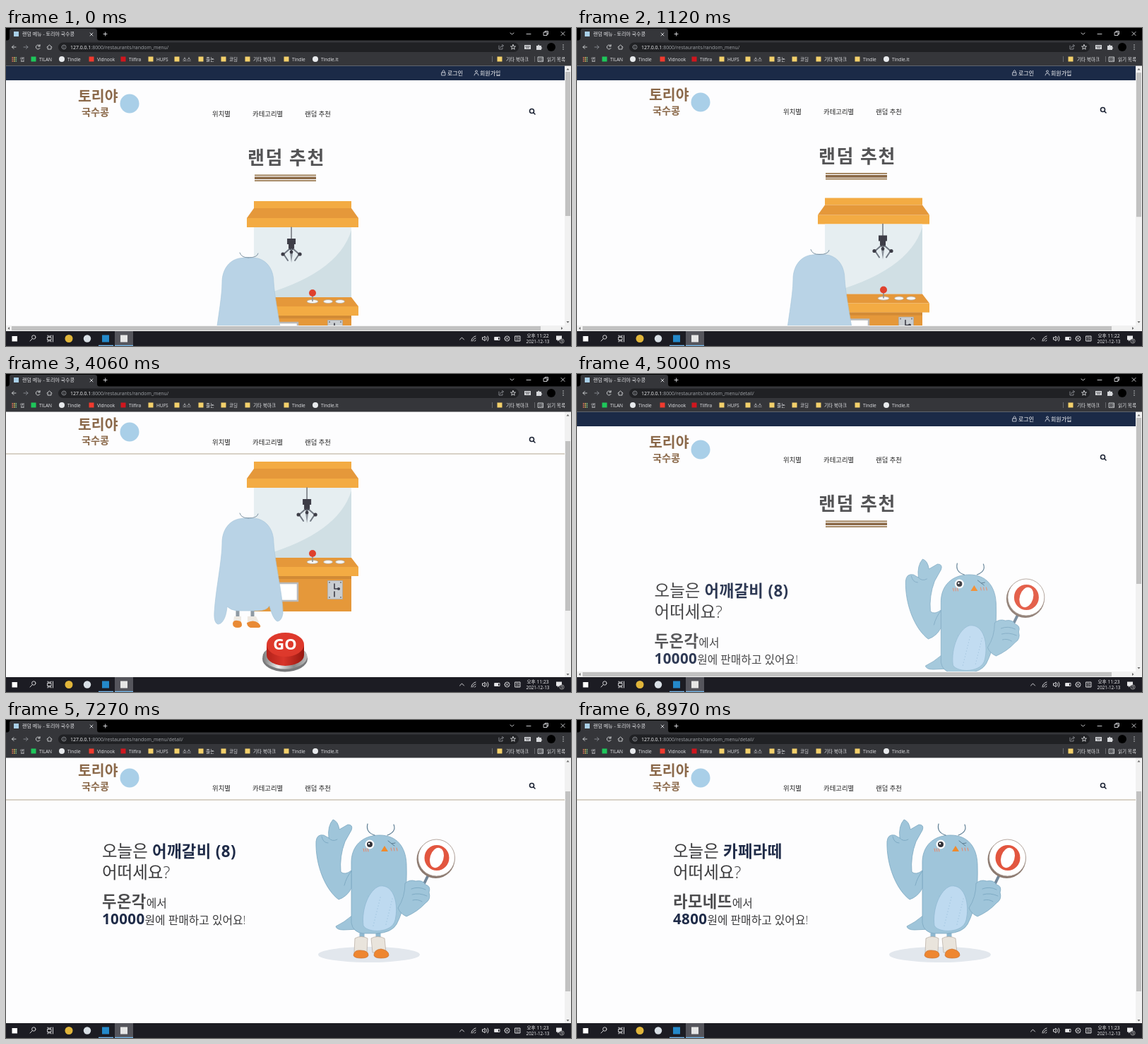
An HTML page for the animation above (9 s loop, 800 by 450 pixels).

```html
<!DOCTYPE html>
<html lang="ko">
<head>
<meta charset="utf-8">
<style>
html, body { margin: 0; width: 100%; height: 100%; overflow: hidden; background: #000 }
svg { display: block; width: 100vw; height: 100vh; font-family: "Open Sans", "Noto Sans CJK KR", sans-serif }
.line { fill: none; stroke-linecap: round; stroke-linejoin: round }
.light { font-weight: 300 }
.big { font-size: 22.3px; font-weight: 700; letter-spacing: .4px }
.pale { fill: #b9d3e6; stroke: #a9c7dc; stroke-width: .7 }
.blue { fill: #9fc5da; stroke: #7ba8c1; stroke-width: .8 }
</style>
</head>
<body>
<svg viewBox="0 0 800 450">
<defs>
  <clipPath id="view"><rect y="53" width="791" height="376"/></clipPath>
  <linearGradient id="metal"><stop stop-color="#777"/><stop offset=".35" stop-color="#eee"/><stop offset=".7" stop-color="#888"/><stop offset="1" stop-color="#bbb"/></linearGradient>
  <linearGradient id="red"><stop stop-color="#b3221a"/><stop offset=".45" stop-color="#d8352a"/><stop offset="1" stop-color="#96170f"/></linearGradient>
</defs>
<rect y="53" width="800" height="376" fill="#fdfdfe"/>

<g clip-path="url(#view)">
  <!-- claw machine page -->
  <g id="menu">
    <path fill="#f3ab43" d="M351 245h138v10H351zM341 269h158v13H341z"/>
    <path fill="#e5983a" d="M351 255H489L499 269H341z"/>
    <path fill="#e6eef1" d="M351 282h138v99H351z"/>
    <path fill="#d0dfe4" d="M489 286Q470 350 351 381H489z"/>
    <g id="claw">
      <path class="line" stroke="#777b82" stroke-width="1.6" d="M0 282v17"/>
      <path fill="#3d3d47" d="M-6 298H6V306H4V314H-4V306H-6z"/>
      <path class="line" stroke="#6f7680" stroke-width="2" d="M-3 313L-11 320L-5 329M3 313L11 320L5 329M0 313V320"/>
      <path fill="#8b929b" d="M-2 318H2L0 332z"/>
      <g fill="#3d3d47"><circle cx="-12" cy="320" r="2.6"/><circle cx="12" cy="320" r="2.6"/><circle cy="317" r="2.4"/></g>
    </g>
    <path fill="#e5983a" d="M351 381H489L499 394H341zM351 407h138v50H351z"/>
    <path fill="#f3ab43" d="M341 394h158v13H341z"/>
    <path fill="#d18a35" d="M351 407h138v4H351z"/>
    <path fill="#fff" stroke="#b9b9b9" stroke-width="2.5" d="M379 417h34v25H379z"/>
    <path fill="#c9cdd1" stroke="#a5a9ad" stroke-width=".7" d="M455.500 413.500h21v26h-21z"/>
    <path class="line" stroke="#3d3d47" stroke-width="1.6" d="M465 418v7M465 429v7M465 425h7"/>
    <circle cx="471" cy="425" r="2" fill="#3d3d47"/>
    <g fill="#777"><circle cx="458" cy="416" r="1"/><circle cx="474" cy="416" r="1"/><circle cx="458" cy="437" r="1"/><circle cx="474" cy="437" r="1"/></g>
    <g fill="#f6f6f6" stroke="#b7aa98" stroke-width=".8">
      <ellipse cx="434" cy="387" rx="8" ry="2.600"/><ellipse cx="456" cy="387" rx="6.500" ry="2.500"/><ellipse cx="473" cy="387" rx="6.500" ry="2.500"/>
    </g>
    <path stroke="#8f8f8f" stroke-width="1.6" d="M434 378v9"/>
    <circle cx="434" cy="375" r="5" fill="#df412d"/>
    <!-- owl from behind -->
    <path stroke="#8f9aa3" stroke-width="5" d="M328 452v13M349 452v13"/>
    <path fill="#eee9e2" d="M323 464h10v8H322zM342 464h12l4 8H342z"/>
    <path fill="#e98a35" d="M321 474q1-5 7-4q6 0 6 6q0 4-6 4q-7 0-7-6M341 473q9-5 16 0q6 6 1 7H346q-5-2-5-7"/>
    <path class="pale" d="M330 326Q343 323 357 326C371 330 379 343 379 360C381 390 393 440 392 460Q390 471 384 471Q378 468 373 449Q369 456 356 456H327Q318 455 313 450C312 464 307 475 300 475Q294 473 295 458C297 425 306 385 306 360C306 343 315 329 330 326z"/>
    <path class="line" stroke="#7d93a3" stroke-width="1" d="M331 318Q333 325 343 325M357 319Q356 325 343 325"/>
    <!-- button -->
    <ellipse cx="395" cy="524" rx="32" ry="18.500" fill="#77787a"/>
    <ellipse cx="395" cy="521" rx="31.500" ry="17.500" fill="url(#metal)"/>
    <path fill="url(#red)" d="M369 505V519A26.500 15 0 0 0 422 519V505z"/>
    <ellipse cx="395.500" cy="504" rx="26.500" ry="17" fill="#de392c"/>
    <text x="395" y="511" font-size="22" font-weight="700" fill="#fff" text-anchor="middle">GO</text>
  </g>

  <!-- result page -->
  <g id="result">
    <g id="words" font-size="23.5" fill="#3a3a3c">
      <text class="light" x="136" y="315" xml:space="preserve">오늘은 <tspan class="big" id="dish" fill="#1f2b48"></tspan></text>
      <text class="light" x="136" y="345">어떠세요?</text>
      <g font-size="15.8">
        <text class="light" x="136" y="386"><tspan class="big" id="shop" fill="#4c4c4e"></tspan>에서</text>
        <text class="light" x="136" y="410"><tspan class="big" id="price" fill="#1f2b48" style="font-size:20.500px"></tspan>원에 판매하고 있어요!</text>
      </g>
    </g>
    <g id="owl"><g transform="translate(0 121)">
      <ellipse cx="514" cy="332" rx="72" ry="11" fill="#e2e7ed"/>
      <path stroke="#8fb8d0" stroke-width="7" d="M504 298v14M527 298v14"/>
      <path fill="#e9e4dc" stroke="#b5aaa0" stroke-width=".7" d="M494 309Q503 304 512 309L511 329H493zM517 309Q526 304 536 309L538 329H519z"/>
      <path fill="#ee8630" stroke="#c86f2b" stroke-width=".7" d="M492 333Q493 325 502 326Q513 326 513 333Q512 337 503 337Q493 337 492 333M521 333Q521 325 531 324Q542 326 542 333Q541 337 531 337Q522 337 521 333"/>
      <path class="blue" d="M491 276Q478 287 467 292Q468 297 478 297L500 296z"/>
      <path class="blue" d="M489 204C488 178 505 163 529 163C553 163 566 179 567 204C568 240 565 266 553 289Q546 301 525 302H505Q491 300 489 287z"/>
      <path fill="#bedaf0" stroke="#8db6d0" stroke-width=".7" d="M529 235C550 232 556 262 551 283C547 302 512 302 506 291C503 267 514 240 529 235z"/>
      <g id="dots" fill="#8fb7d4"></g>
      <path class="blue" d="M471 254C452 240 438 205 439 172Q440 161 450 163L457 167Q455 150 463 141Q470 143 472 155L484 148Q492 148 489 156L480 172Q472 193 474 215Q480 220 489 213V238Q483 250 471 254z"/>
      <path class="line" stroke="#7ba8c1" stroke-width=".9" d="M457 167Q462 173 469 169M447 165Q449 174 456 174M489 214Q482 222 479 234"/>
      <path class="line" stroke="#5f7f95" stroke-width="1.2" d="M512 147Q509 159 522 163M549 148Q553 158 540 163"/>
      <circle cx="515" cy="176" r="6.500" fill="#fff"/><circle cx="515" cy="176" r="4" fill="#33343b"/><circle cx="514" cy="175" r="1.200" fill="#fff"/>
      <path class="line" stroke="#597b90" stroke-width="1" d="M541 171L546 175L551 174M546 175L550 178"/>
      <path fill="#f08a2c" d="M536 178L531 186H541z"/>
      <path class="line" stroke="#e28d72" stroke-width="1.1" d="M506 182l1 4M509 182l1 4M512 182l1 4M545 181l1 4M549 181l1 4M553 181l1 4"/>
      <path stroke="#72879a" stroke-width="4" d="M600 215L584 248"/>
      <circle cx="608.500" cy="197" r="27" fill="#8c7a70"/>
      <circle cx="609.500" cy="195" r="26" fill="#fff" stroke="#a08f84" stroke-width=".8"/>
      <ellipse cx="610" cy="195" rx="17.500" ry="18" fill="#e2563f"/>
      <ellipse cx="610" cy="195" rx="9.500" ry="14.500" fill="#fff" transform="rotate(17 610 195)"/>
      <path class="blue" d="M565 231Q572 225 580 228Q590 226 594 233Q602 235 599 244Q602 254 594 259Q583 271 567 278Q558 274 555 266Q565 251 565 231z"/>
      <path class="line" stroke="#7ba8c1" stroke-width=".9" d="M574 239Q584 235 594 240M575 247Q585 244 596 249M576 255Q583 253 589 257"/>
    </g></g>
  </g>

  <g id="title">
    <text x="342" y="193" font-size="26" font-weight="700" letter-spacing="1.5" fill="#545456">랜덤 추천</text>
    <path fill="#9a7a50" d="M352 207.500h87v1.700h-87zM352 215.300h87v1.700h-87z"/>
    <path fill="#8b6a48" d="M352 210.500h87v3.600h-87z"/>
  </g>

  <g id="bar"><path fill="#fdfdfe" d="M0 53h791v60H0z"/><path fill="#b3a692" d="M0 112.500h791v1H0z"/></g>
  <g id="head">
    <g fill="#8b694a" font-weight="700"><text x="102" y="104" font-size="20.500">토리야</text><text x="107" y="124" font-size="14.200">국수콩</text></g>
    <circle cx="175" cy="107" r="13.500" fill="#a9cfe8"/>
    <g font-size="9.4" fill="#222"><text x="292" y="124.500">위치별</text><text x="349" y="124.500">카테고리별</text><text x="423" y="124.500">랜덤 추천</text></g>
    <path class="line" stroke="#1b2233" stroke-width="1.6" d="M747 120l2 2M747.500 117.500a3 3 0 1 0-6 0a3 3 0 1 0 6 0"/>
  </g>
  <g id="top">
    <path fill="#1b2a47" d="M0 53.500h791V74H0z"/>
    <g fill="#fff" font-size="8"><text x="625" y="66.500">로그인</text><text x="671" y="66.500">회원가입</text></g>
    <path class="line" stroke="#d8dce4" stroke-width=".8" d="M617 63h5v4h-5zM618 63v-2q1.500-3 3 0v2M663 67q0-3 3-3t3 3M664.500 61.500a1.500 1.500 0 1 0 3 0a1.500 1.500 0 1 0-3 0"/>
  </g>
</g>

<path fill="#f1f1f1" d="M791 53.500h9V429h-9z"/>
<rect id="thumb" x="792" width="7" fill="#c1c1c1"/>
<path fill="#666" d="M793.500 59.500l2-2.500l2 2.500z"/>
<path id="down" fill="#666" d="M793.500 424l2 2.500l2-2.500z"/>
<g id="hbar">
  <path fill="#f1f1f1" d="M0 421h800v8H0z"/><path fill="#c1c1c1" d="M8 422h749v6H8z"/>
  <path fill="#666" d="M5 423l-2.500 2l2.500 2zM786 423l2.500 2l-2.500 2z"/>
</g>

<!-- browser frame -->
<path d="M0 0h800v18H0z"/>
<path fill="#35363a" d="M0 17.500H2Q5 17 5 13V4Q5 1 8 1H125Q129 1 129 4V14Q129 17.500 132 17.500H800V53.500H0z"/>
<rect x="11" y="5" width="7" height="7" fill="#a9cfe8"/>
<text x="23" y="11" font-size="7" fill="#e4e5e8">랜덤 메뉴 - 토리야 국수콩</text>
<path class="line" stroke="#dcdde0" stroke-width=".9" d="M119 7l4 4M123 7l-4 4M138 8.500h5M140.500 6v5M714 7l2.500 2l2.500-2M737 8.500h6M761.500 6h4.500v4.500h-4.500zM763 6V4.500h4.500V9H766M786 5.500l5 5M791 5.500l-5 5"/>
<rect x="74" y="20.500" width="652" height="13.500" rx="6.700" fill="#202124"/>
<text x="91" y="29.700" font-size="6.950" fill="#9fa3a8"><tspan fill="#f1f2f4">127.0.0.1</tspan><tspan id="path"></tspan></text>
<g class="line" stroke="#d5d7da" stroke-width=".9">
  <path d="M14 27H8.500M11 24.500L8.500 27L11 29.500M48 25.500A3 3 0 1 0 48 28.500M48 23.500v2.500h-2.500M58 27l3.500-3l3.500 3M59 27v3h5v-3"/>
  <path stroke="#8b8e93" d="M25 27h6M28.500 24.500L31 27L28.500 29.500M79 27a3 3 0 1 0 6 0a3 3 0 1 0-6 0M82 26.500v2M82 25.200v.1M698 25v5h5v-2M700 28q0-3 4-3M702.500 23.500L704.500 25L702.500 26.500"/>
  <path d="M718 23.500l1 2.500h2.500l-2 1.700l.7 2.500l-2.200-1.500l-2.200 1.500l.7-2.500l-2-1.700h2.500z"/>
</g>
<path fill="#d5d7da" d="M734 24h9v6h-9zM751 25h2q1-3 2.500 0h2.500v2.200q2.500 1 0 2v1.800h-7z"/>
<path stroke="#35363a" stroke-width=".8" d="M735 26h7M736 28h5"/>
<circle cx="772" cy="27" r="6"/>
<path class="line" stroke="#d5d7da" stroke-width="1.500" d="M789 24v.1M789 27v.1M789 30v.1"/>
<g id="marks" font-size="6.600" fill="#e4e5e8"></g>
<path stroke="#66686c" d="M688.500 40v8M748.500 40v8"/>
<path class="line" stroke="#d5d7da" stroke-width=".9" d="M753.500 41h7v6.500h-7zM755 43h1M757.500 43h2M755 45.500h1M757.500 45.500h2"/>

<!-- taskbar -->
<path fill="#1c1c23" d="M0 429h800v21H0z"/>
<path fill="#55555c" d="M154 429h26v21h-26z"/>
<path fill="#76b9ed" d="M131 448.800h21v1.200h-21zM154 448.800h26v1.200h-26z"/>
<path fill="#fff" d="M8.500 436h7.500v7.500H8.500z"/>
<circle cx="89" cy="439.500" r="5.500" fill="#e0b53a"/>
<circle cx="115" cy="439.500" r="5.200" fill="#d8dfe5"/>
<path fill="#2489ca" d="M136 434.500h10v10h-10z"/>
<path fill="#e6e6e6" d="M162 434.500h10v10h-10z"/>
<g class="line" stroke="#e8e8ea" stroke-width=".9">
  <path d="M34 443l3-3M42 437.500a2.700 2.700 0 1 0-5.400 0a2.700 2.700 0 1 0 5.400 0M59 437.500h5v4h-5zM59 435v1h5v-1M59 444v-1h5v1M66.500 435v9"/>
  <path d="M642.500 441l3-3l3 3M659 443q0-5 6-7M661 443q0-3 4-4M663.500 443l1.500-1M674.500 438v3h1.500l2 2v-7l-2 2zM680 437.500q1.500 2 0 4M682 436q2.500 3.500 0 7M692 437.500h7v4h-7zM706 439.500a3.500 3.500 0 1 0 7 0a3.500 3.500 0 1 0-7 0M708 438l3 3M711 438l-3 3M721 436h7v7h-7z"/>
</g>
<path fill="#e8e8ea" d="M692 437.500h5v4h-5zM779 435.500h8v6h-4l-2 2v-2h-2z"/>
<circle cx="787" cy="443" r="3.200" fill="#35353b" stroke="#ddd" stroke-width=".5"/>
<g fill="#f1f1f3" font-size="6.7" text-anchor="middle">
  <text x="724.500" y="442" font-size="6">한</text><text x="787" y="445" font-size="5.500">1</text>
  <text id="clock" x="753" y="437.500"></text><text x="753" y="446.300" font-size="6.300">2021-12-13</text>
</g>
</svg>
<script>
const $ = id => document.getElementById(id);
const FOLDER = '#f3d06b';

// [icon x, text x, label, icon colour, round]
const marks = [
  [39, 47, 'TILAN', '#1ec75a'], [79, 87, 'Tindle', '#e8eaed', 1], [121, 129, 'Vidnook', '#f03a2e'],
  [166, 174, 'Tilfira', '#d0161e'], [205, 213, 'HUFS', FOLDER], [242, 250, '소스', FOLDER],
  [276, 283, '졸논', FOLDER], [308, 316, '코딩', FOLDER], [342, 350, '기타 북마크', FOLDER],
  [397, 405, 'Tindle', FOLDER], [438, 446, 'Tindle.It', '#e8eaed', 1], [699, 708, '기타 북마크', FOLDER]
];
let html = '<text x="20" y="46.5">앱</text><text x="766" y="46.5">읽기 목록</text>';
for (let i = 0; i < 9; i++)
  html += `<rect x="${8.5 + i % 3 * 2.5}" y="${41 + (i / 3 | 0) * 2.5}" width="1.6" height="1.6" fill="${['#e8785f', '#dfc05a', '#79b98a'][i % 3]}"/>`;
for (const [x, tx, label, color, round] of marks)
  html += (round ? `<circle cx="${x}" cy="44" r="4" fill="${color}"/>`
    : `<rect x="${x - 3.5}" y="40.5" width="7" height="7" fill="${color}"/>`) + `<text x="${tx}" y="46.5">${label}</text>`;
$('marks').innerHTML = html;

let dots = '';
for (let i = 0; i < 22; i++)
  dots += `<circle cx="${513 + i * 17 % 35}" cy="${249 + i * 2}" r=".6"/>`;
$('dots').innerHTML = dots;

const clamp = v => Math.max(0, Math.min(1, v));
const smooth = v => (v = clamp(v), v * v * (3 - 2 * v));
const show = (id, on) => $(id).style.display = on ? '' : 'none';
const move = (id, x, y) => $(id).setAttribute('transform', `translate(${x} ${y})`);
const write = (id, text) => { if ($(id).textContent !== text) $(id).textContent = text; };
const LOAD = 4400, RELOAD = 7900;

function draw(t) {
  const detail = t >= LOAD, again = t >= RELOAD;
  const scroll = 121 * smooth((t - (detail ? 6004 : 1040)) / 700);
  const stuck = scroll > 12;
  show('menu', !detail);
  show('result', detail);
  show('top', !stuck);
  show('bar', stuck);
  show('hbar', !stuck);
  move('menu', 0, -scroll);
  move('result', 0, -scroll);
  move('title', 0, -Math.max(scroll * .55, scroll - 4));
  move('head', 0, -Math.min(25, scroll * .45));
  move('down', 0, stuck ? 0 : -9);
  move('claw', 414.3 + 21.4 * Math.sin(t * .0023 - .5), 0);

  // text and owl slide in from opposite sides
  const left = (1 - clamp((t - (again ? 8150 : 4750)) / 700)) ** 3;
  move('words', -100 * left, 0);
  move('owl', 100 * left, 0);
  $('result').setAttribute('opacity', 1 - left * left);

  $('thumb').setAttribute('y', 62 + scroll / 121 * (detail ? 39 : 33));
  $('thumb').setAttribute('height', detail ? (stuck ? 283 : 235) : (stuck ? 240 : 204));
  write('path', ':8000/restaurants/random_menu/' + (detail ? 'detail/' : ''));
  write('dish', again ? '카페라떼' : '어깨갈비 (8)');
  write('shop', again ? '라모네뜨' : '두온각');
  write('price', again ? '4800' : '10000');
  write('clock', t < 1900 ? '오후 11:22' : '오후 11:23');
}

const start = performance.now();
(function tick() {
  draw((performance.now() - start) % 9000);
  requestAnimationFrame(tick);
})();
</script>
</body>
</html>
```
